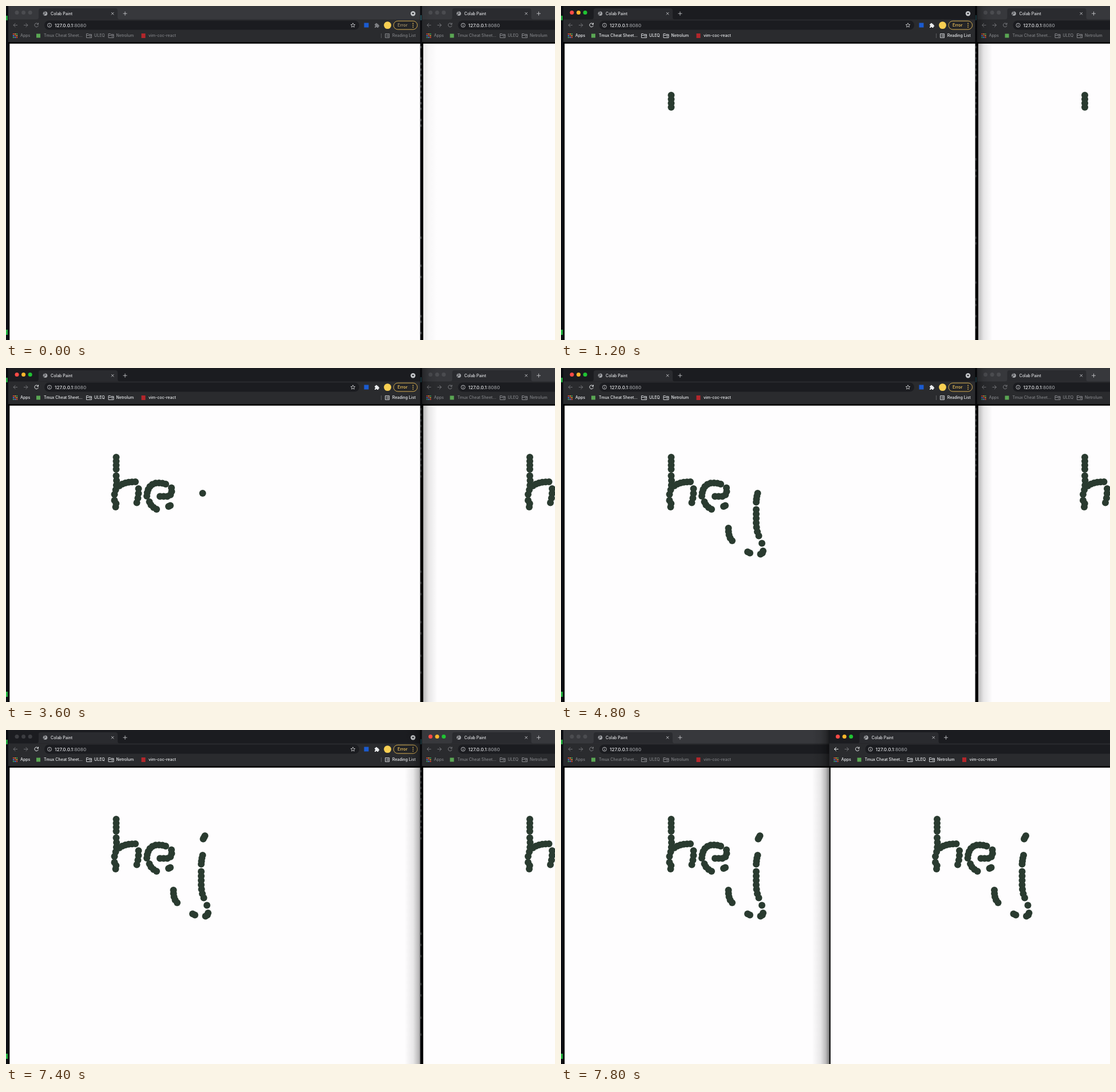
An HTML page for the animation above (8000 ms loop, 959 px wide and 584 px high).

```html
<!DOCTYPE html>
<html lang="en">
<head>
<meta charset="utf-8">
<title>Colab Paint</title>
<style>
html, body { margin: 0; width: 100%; height: 100%; overflow: hidden; background: #000; }
svg { display: block; width: 100vw; height: 100vh; font: 500 7px Inter, Roboto, sans-serif; }
.window { color: #7f8084; }
.window.on { color: #eceef0; }
.soft { color: #85868a; }
.on .soft { color: #c9cbce; }
.dim { color: #717276; }
.frame { fill: #37383c; }
.on .frame { fill: #1b1c20; }
.label { fill: currentColor; }
.bright { fill: #e3e4e7; }
.line { fill: none; stroke: currentColor; }
.fixed { fill: none; stroke: #c4c6c9; stroke-width: .9; }
.lights circle { fill: #4b4c50; }
.on .lights circle { fill: #3c3d41; }
.lit .lights :nth-child(1) { fill: #ff4b46; }
.lit .lights :nth-child(2) { fill: #ffb52b; }
.lit .lights :nth-child(3) { fill: #20c433; }
.shadow { opacity: .3; }
.lit .shadow { opacity: 1; }
.history.on .back { color: #eceef0; }
.error { fill: #a8956a; }
.on .error { fill: #f3c65c; }
</style>
</head>
<body>
<svg viewBox="0 0 959 584" preserveAspectRatio="none">
  <defs>
    <linearGradient id="fade">
      <stop offset="0" stop-opacity=".5"/>
      <stop offset=".2" stop-opacity=".26"/>
      <stop offset=".5" stop-opacity=".09"/>
      <stop offset="1" stop-opacity="0"/>
    </linearGradient>
    <linearGradient id="fadeLeft" href="#fade" x1="1" x2="0"/>
  </defs>
  <g id="terminal"></g>
  <g id="windows"></g>
</svg>
<script>
const LOOP = 8000, STEP = 200, HEIGHT = 584;
const LEFT = 4, WIDTH = 719.5, OFFSET = 722.5;
const FOCUS = 800, PRESS = 7400, RAISE = 7600;
const SVG = 'http://www.w3.org/2000/svg';
const byId = id => document.getElementById(id);
const clamp = k => Math.min(1, Math.max(0, k));
const repeat = (count, draw) => Array.from({ length: count }, (_, i) => draw(i)).join('');

// Brush strokes of each letter: a curve and how many dabs lie evenly along it
const letters = [
  { start: 1000, end: 2000, curves: {
    'M192.5 156V177': 4,
    'M192.5 188.5Q194.5 206 189.5 221': 5,
    'M189.5 231.5Q194 236 191.5 243': 3,
    'M198 206Q207 199 226 199': 6,
    'M231.5 211Q232 224 228.5 235.5': 4 } },
  { start: 2200, end: 3200, curves: {
    'M269 224.5H284Q291 221 289 209.5': 6,
    'M279 203Q248 194 246 224': 9,
    'M250.5 234Q253 242 263 247': 4,
    'M284 242L287 240.5': 2 } },
  { start: 3550, end: 4600, curves: {
    'M343.5 219Q341.5 226 341 234.5': 4,
    'M341 247.5V266Q340.5 282 345.5 293.5': 7,
    'M351 306.5v.1': 1,
    'M353 320Q353 324 348.5 325.5': 3,
    'M330 323.5L326 321.5': 2,
    'M299 302Q292 295 292.5 280': 5 } },
  { start: 5000, end: 5200, curves: { 'M347.5 185L344.5 190.5': 3 } },
];

const rect = (x, y, w, h, fill, rx = 0) =>
  `<rect x="${x}" y="${y}" width="${w}" height="${h}" fill="${fill}" rx="${rx}"/>`;
const circle = (x, y, r, fill) => `<circle cx="${x}" cy="${y}" r="${r}" fill="${fill}"/>`;
const text = (x, y, words, cls = 'label', size = 7) =>
  `<text class="${cls}" x="${x}" y="${y}" font-size="${size}">${words}</text>`;
const line = (d, cls = '') => `<g class="${cls}"><path class="line" d="${d}"/></g>`;
const fixed = d => `<path class="fixed" d="${d}"/>`;
const arrow = (x, dir, cls) =>
  line(`M${x - 3.5 * dir} 33.5h${7 * dir}m${-3.5 * dir}-3.5l${3.5 * dir} 3.5 ${-3.5 * dir} 3.5`, cls);
const folder = x => line(
  `M${x} 55.5v-7h3.3l1 1.2h4.7v5.8zM${x} 51.4h9M${x + 5.5} 53.5h2`, 'soft');

function tabStrip() {
  return `<rect class="frame" x="${LEFT}" width="${WIDTH}" height="24"/>
    <g class="lights">${repeat(3, i => circle(19 + i * 11.6, 11.5, 3.5, ''))}</g>
    <path fill="#2a2b2f" d="M53 23.5q4 0 4-4V8q0-4 4-4h130q4 0 4 4v11.5q0 4 4 4z"/>
    ${circle(68.5, 13.3, 3.8, '#a3a5a9')}
    <path d="M66 11.5q2-2 3 0t-1.5 2-1 2.5" fill="none" stroke="#2a2b2f"/>
    ${text(78, 15.6, 'Colab Paint', 'bright')}
    ${fixed('M184 11l4.4 4.4m0-4.4l-4.4 4.4M204.5 13.2h7m-3.5-3.5v7')}
    ${circle(711, 13.2, 4.2, '#c4c6c9')}<path d="M708.8 12h4.4l-2.2 3z" fill="#27282c"/>`;
}

function star(cx, cy) {
  const corner = i => {
    const r = i % 2 ? 1.8 : 4, a = i * Math.PI / 5;
    return `${i ? 'L' : 'M'}${cx + r * Math.sin(a)} ${cy - r * Math.cos(a)}`;
  };
  return fixed(repeat(10, corner) + 'z');
}

function toolbar() {
  return `${rect(LEFT, 23.5, WIDTH, 39.5, '#2a2b2e')}
    ${arrow(16.5, -1, 'dim back')}${arrow(34.5, 1, 'dim')}
    ${line('M56 31.5a3.3 3.3 0 1 0 .4 2.8M56.5 29.5v2.7h-2.7')}
    ${rect(67, 25.5, 550, 16, '#1b1c20', 8)}
    ${fixed('M72.5 33.6a3.5 3.5 0 1 0 7 0a3.5 3.5 0 1 0-7 0M76 33v2.6M76 31.3v.9')}
    <text class="bright" x="85" y="36.6" font-size="8.2">127.0.0.1<tspan fill="#96989c">:8080</tspan></text>
    ${star(606, 33.8)}
    ${rect(625.5, 29.5, 8, 8, '#1b5bd0')}
    ${rect(644, 31.5, 6.5, 6.5, 'currentColor', .5)}
    ${circle(647, 31.3, 1.5, 'currentColor')}${circle(650.6, 34.8, 1.5, 'currentColor')}
    ${circle(644, 34.8, 1.2, '#2a2b2e')}${circle(647, 38, 1.2, '#2a2b2e')}
    ${circle(666.5, 33.6, 6.4, '#f8cf52')}
    <rect x="677" y="26.2" width="41.5" height="14.8" rx="7.4" fill="#232427" stroke="#d9b052"/>
    ${text(684, 36.2, 'Error', 'error', 7.3)}
    ${repeat(3, i => circle(711, 30.4 + i * 3.2, .9, '#f3c65c'))}`;
}

function bookmarks() {
  const tints = ['#e5473b', '#e9a03a', '#43a65a', '#4385ea'];
  const y = 54.4;
  return `${repeat(9, i => rect(12 + i % 3 * 3, 48 + Math.floor(i / 3) * 3, 2, 2, tints[i % 4]))}
    ${text(25, y, 'Apps')}
    ${rect(53, 48.5, 7, 7, '#5aa653')}${text(66, y, 'Tmux Cheat Sheet...')}
    ${folder(140.5)}${text(154, y, 'ULEQ')}
    ${folder(179)}${text(192.5, y, 'Netrolum')}
    ${rect(236.5, 48, 7, 8, '#b3262b')}${text(249, y, 'vim-coc-react')}
    ${rect(655, 48, 1, 8, '#5a5b5f')}
    ${line('M662.5 48.5h7v7h-7z' + repeat(3, i => `M664 ${50.4 + i * 1.6}h1m1 0h2.3`), 'soft')}
    ${text(674.7, y, 'Reading List')}`;
}

// Evenly spaced dabs along a curve
function paint(ink, d, count) {
  const curve = document.createElementNS(SVG, 'path');
  curve.setAttribute('d', d);
  const gap = curve.getTotalLength() / Math.max(1, count - 1);
  return Array.from({ length: count }, (_, i) => {
    const { x, y } = curve.getPointAtLength(i * gap);
    const dab = document.createElementNS(SVG, 'circle');
    for (const [key, value] of Object.entries({ cx: x, cy: y, r: 6, fill: '#2a3b30' }))
      dab.setAttribute(key, value);
    return ink.appendChild(dab);
  });
}

function makeWindow(shadowX, fade) {
  const node = document.createElementNS(SVG, 'g');
  node.innerHTML = `<rect class="shadow" x="${shadowX}" width="30" height="${HEIGHT}" fill="url(#${fade})"/>
    ${rect(LEFT, 0, WIDTH, HEIGHT, '#000')}${tabStrip()}${toolbar()}${bookmarks()}
    ${rect(6.3, 65.8, LEFT + WIDTH - 6.3, HEIGHT, '#fefdfe')}<g class="ink"></g>`;
  byId('windows').append(node);
  const ink = node.querySelector('.ink');
  const dabs = letters.map(({ curves }) =>
    Object.entries(curves).flatMap(([d, count]) => paint(ink, d, count)));
  return { node, dabs };
}

const right = makeWindow(LEFT - 30, 'fadeLeft');
const left = makeWindow(LEFT + WIDTH, 'fade');

// Slivers of the terminal that show beside the windows
function drawTerminal(phase) {
  const random = i => Math.abs(Math.sin(i * 12.9898 + phase * 4.1) * 43758.5453) % 1;
  byId('terminal').innerHTML = rect(0, 0, 959, HEIGHT, '#0b0d12')
    + rect(0, 17, 3, 8, '#22a53c') + rect(0, 566, 3, 9, '#22b53f')
    + rect(723.5, 16, 2.5, 9, '#2c6470')
    + repeat(52, i => random(i) < (i < 13 ? .8 : .25) ? rect(724, 70 + i * 9.8, 1.6, 4, '#74767b') : '');
}

function render(time) {
  const leftLit = time >= FOCUS && time < PRESS;
  const leftOn = time >= FOCUS && time < RAISE;
  const drag = clamp((time - PRESS) / 400) ** 1.6;
  drawTerminal(Math.min(2, Math.floor(time / 1000)));
  left.node.setAttribute('class', `window ${leftLit ? 'lit' : ''} ${leftOn ? 'on' : ''}`);
  right.node.setAttribute('class',
    `window history ${time >= PRESS ? 'lit' : ''} ${time >= RAISE ? 'on' : ''}`);
  right.node.setAttribute('transform', `translate(${OFFSET - 258 * drag})`);
  byId('windows').append((time >= PRESS ? right : left).node);
  letters.forEach(({ start, end }, i) => {
    const progress = clamp((time - start) / (end - start));
    for (const { dabs } of [left, right])
      dabs[i].forEach((dab, n) => {
        const shown = n < Math.floor(dabs[i].length * progress);
        dab.setAttribute('visibility', shown ? 'visible' : 'hidden');
      });
  });
}

const begin = performance.now();
let lastStep = -1;
function tick() {
  const step = Math.floor((performance.now() - begin) % LOOP / STEP);
  if (step !== lastStep) render((lastStep = step) * STEP);
  requestAnimationFrame(tick);
}
tick();
</script>
</body>
</html>
```
